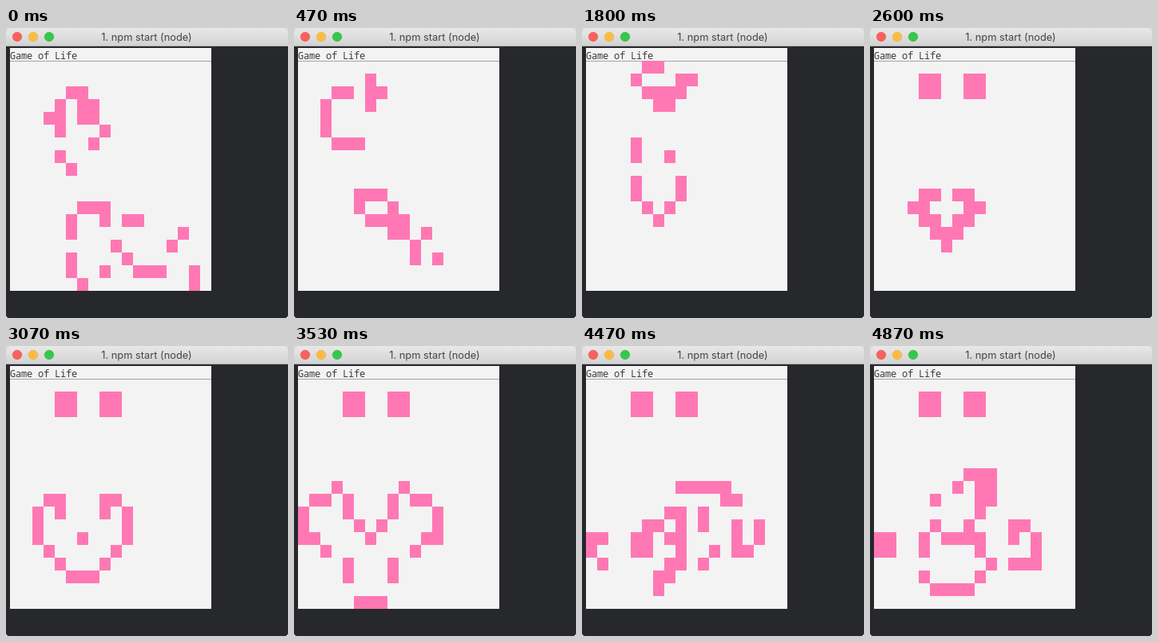
These frames come from a looping animation (353 by 363 pixels, 4.99 s). An HTML page with a canvas:

```html
<!DOCTYPE html>
<html lang="en">
<head>
<meta charset="utf-8">
<title>Game of Life</title>
<style>
  html, body { margin: 0; width: 100%; height: 100%; overflow: hidden; background: #fff; }
  canvas { display: block; }
</style>
</head>
<body>
<canvas id="stage" width="353" height="363"></canvas>
<script>
const W = 353, H = 363, BAR = 23;
const SIZE = 18, CELL_W = 14, CELL_H = 16, LEFT = 5, TOP = 41;
const LOOP = 4990, TICK = 400 / 3, GENERATIONS = 38;

// Live columns of the starting board, keyed by row.
const SEED = {
  2: [5, 6], 3: [4, 6, 7], 4: [3, 4, 6, 7], 5: [4, 8], 6: [7], 7: [4], 8: [5],
  11: [6, 7, 8], 12: [5, 8, 10, 11], 13: [5, 15], 14: [9, 14], 15: [5, 10],
  16: [5, 8, 11, 12, 13, 16], 17: [6, 16]
};

const canvas = document.getElementById('stage');
const ctx = canvas.getContext('2d');
const ratio = window.devicePixelRatio || 1;
canvas.width = W * ratio;
canvas.height = H * ratio;
canvas.style.width = W + 'px';
canvas.style.height = H + 'px';
ctx.scale(ratio, ratio);

function makeBoard(isAlive) {
  return Array.from({ length: SIZE }, (_, r) =>
    Array.from({ length: SIZE }, (_, c) => isAlive(r, c) ? 1 : 0));
}

// Everything outside the board counts as dead.
function step(board) {
  const at = (r, c) => (board[r] && board[r][c]) || 0;
  return makeBoard((r, c) => {
    let sum = 0;
    for (let dr = -1; dr <= 1; dr++)
      for (let dc = -1; dc <= 1; dc++) sum += at(r + dr, c + dc);
    return sum === 3 || (sum === 4 && at(r, c));
  });
}

const history = [makeBoard((r, c) => (SEED[r] || []).includes(c))];
while (history.length < GENERATIONS) history.push(step(history[history.length - 1]));

function rect(x, y, w, h, color) {
  ctx.fillStyle = color;
  ctx.fillRect(x, y, w, h);
}

function dot(x, color, edge) {
  ctx.beginPath();
  ctx.arc(x, 11, 5.75, 0, Math.PI * 2);
  ctx.fillStyle = color;
  ctx.fill();
  ctx.lineWidth = 0.5;
  ctx.strokeStyle = edge;
  ctx.stroke();
}

function text(str, x, y, font, color, align, spacing) {
  ctx.font = font;
  ctx.fillStyle = color;
  ctx.textAlign = align;
  ctx.letterSpacing = spacing;
  ctx.fillText(str, x, y);
}

function drawWindow() {
  rect(0, 0, W, H, '#27282c');
  const shade = ctx.createLinearGradient(0, 0, 0, BAR);
  shade.addColorStop(0, '#e8e8e8');
  shade.addColorStop(1, '#d2d2d2');
  rect(0, 0, W, BAR - 1, shade);
  rect(0, BAR - 1, W, 1, '#b4b4b4');
  dot(14, '#fc605b', '#e0443e');
  dot(34, '#fdbc40', '#dea236');
  dot(54, '#34c84a', '#27aa35');
  text('1. npm start (node)', 176, 16, '12.8px Inter, sans-serif', '#444', 'center', '0px');
}

function drawBoard(board) {
  rect(LEFT, 25, SIZE * CELL_W, 304, '#f3f3f3');
  text('Game of Life', LEFT, 39, '12px "Noto Sans Mono", monospace', '#3c3c3c', 'left', '-0.2px');
  rect(LEFT, TOP, SIZE * CELL_W, 1, '#a4a4a4');
  board.forEach((row, r) => row.forEach((alive, c) => {
    if (alive) rect(LEFT + c * CELL_W, TOP + r * CELL_H, CELL_W, CELL_H, '#ff78b4');
  }));
}

function draw(now) {
  const t = now % LOOP;
  const gen = Math.min(GENERATIONS - 1, Math.floor((t + 70.1) / TICK));
  ctx.clearRect(0, 0, W, H);
  ctx.save();
  ctx.beginPath();
  ctx.roundRect(0, 0, W, H, 4);
  ctx.clip();
  drawWindow();
  drawBoard(history[gen]);
  ctx.restore();
}

let start = null;
function frame() {
  const now = performance.now();
  if (start === null) start = now;
  draw(now - start);
  requestAnimationFrame(frame);
}
frame();
</script>
</body>
</html>
```
